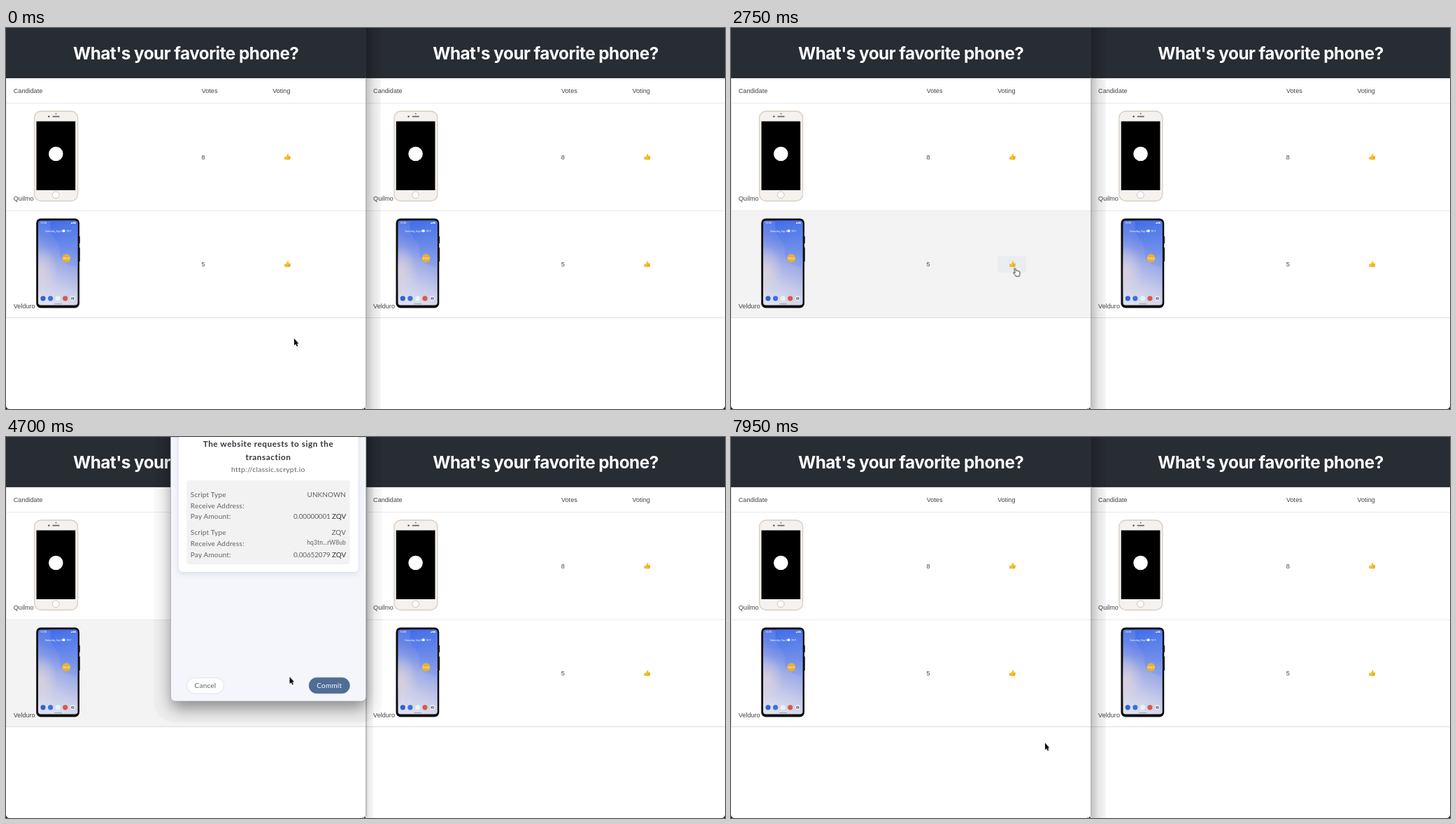
An HTML page that plays this animation: 1028 px wide and 545 px high, repeating every 8 s.

```html
<!DOCTYPE html>
<html lang="en">
<head>
<meta charset="utf-8">
<title>Favorite phone vote</title>
<style>
  html, body { margin: 0; width: 100%; height: 100%; overflow: hidden; background: #000; }
  svg { display: block; width: 1028px; height: 545px; }
  .title { font: 700 24.3px Inter, sans-serif; letter-spacing: -.52px; fill: #fff; text-anchor: middle; }
  .cell { font: 9.1px "Liberation Sans", Arial, sans-serif; fill: #444; }
  .tiny { font: 3.6px Roboto, sans-serif; fill: #fff; }
  .dialog { font: 10px Lato, sans-serif; fill: #606266; letter-spacing: .2px; }
  .head { font-size: 11.8px; font-weight: 700; fill: #33363c; letter-spacing: .53px; text-anchor: middle; }
  .url { font-size: 10.4px; letter-spacing: .3px; }
  .mid { text-anchor: middle; }
  .end { text-anchor: end; letter-spacing: .05px; }
  .sum { letter-spacing: -.18px; }
  .addr { font-size: 8.6px; }
  .unit { fill: #303236; }
  .line { stroke: #e9e9e9; }

  /* One shared 8 s clock; switches are hard steps. */
  .switch { animation: 8s step-end infinite; }
  #row1 { animation-name: row1; }
  #row2 { animation-name: row2; }
  #vote { animation-name: vote; }
  #popup { animation-name: popup; }
  #softShade { animation-name: blurred; }
  #deepShade { animation-name: focused; }
  #arrow { animation-name: arrow; }
  #hand { animation-name: hand; }
  #cursor { animation: move 8s ease-in-out infinite; }

  @keyframes row1 { 0%, 21.1%, 100% { opacity: 0 } 15.9% { opacity: 1 } }
  @keyframes row2 { 0%, 15.9%, 73%, 100% { opacity: 0 } 9%, 21.1% { opacity: 1 } }
  @keyframes vote { 0%, 58%, 100% { opacity: 0 } 24% { opacity: 1 } }
  @keyframes popup { 0%, 70%, 100% { opacity: 0 } 58% { opacity: 1 } }
  @keyframes blurred { 0%, 70%, 100% { opacity: 0 } 57.4% { opacity: 1 } }
  @keyframes focused { 0%, 70%, 100% { opacity: 1 } 57.4% { opacity: 0 } }
  @keyframes arrow { 0%, 58%, 70%, 100% { opacity: 1 } 24%, 62.8% { opacity: 0 } }
  @keyframes hand { 0%, 58%, 70%, 100% { opacity: 0 } 24%, 62.8% { opacity: 1 } }
  @keyframes move {
    0% { transform: translate(412px, 444px) }
    5.5% { transform: translate(412px, 444px); animation-timing-function: ease-in }
    15.625% { transform: translate(353px, 260px); animation-timing-function: ease-out }
    18.125%, 18.75% { transform: translate(350px, 238px) }
    26.25%, 60% { transform: translate(405.5px, 343px) }
    65.6%, 70% { transform: translate(460px, 354px) }
    75%, 100% { transform: translate(449px, 437.5px) }
  }
</style>
</head>
<body>
<svg viewBox="0 0 1028 545">
  <defs>
    <linearGradient id="deep">
      <stop offset="0" stop-color="#000" stop-opacity=".24"/>
      <stop offset=".5" stop-color="#000" stop-opacity=".1"/>
      <stop offset="1" stop-color="#000" stop-opacity=".035"/>
    </linearGradient>
    <linearGradient id="soft">
      <stop offset="0" stop-color="#000" stop-opacity=".2"/>
      <stop offset=".3" stop-color="#000" stop-opacity=".08"/>
      <stop offset="1" stop-color="#000" stop-opacity=".025"/>
    </linearGradient>
    <linearGradient id="sky" x1=".6" y1="0" x2=".4" y2="1">
      <stop offset="0" stop-color="#4a76ea"/>
      <stop offset=".25" stop-color="#6886e8"/>
      <stop offset=".5" stop-color="#a0ade7"/>
      <stop offset=".75" stop-color="#c6cbea"/>
      <stop offset="1" stop-color="#dfe0ee"/>
    </linearGradient>
    <linearGradient id="wave" x1="0" y1="0" x2=".2" y2="1">
      <stop offset="0" stop-color="#3f6be8"/>
      <stop offset="1" stop-color="#7f9cec" stop-opacity=".5"/>
    </linearGradient>
    <radialGradient id="warm">
      <stop offset="0" stop-color="#e2d4da" stop-opacity=".75"/>
      <stop offset="1" stop-color="#e2d4da" stop-opacity="0"/>
    </radialGradient>
    <filter id="blur" x="-30%" y="-30%" width="160%" height="160%"><feGaussianBlur stdDeviation="11"/></filter>
    <filter id="blurSmall" x="-10%" y="-10%" width="120%" height="120%"><feGaussianBlur stdDeviation="4"/></filter>
    <clipPath id="screen"><rect x="46" y="275.5" width="56.5" height="121" rx="4"/></clipPath>
    <clipPath id="leftHalf"><rect width="515" height="545"/></clipPath>

    <g id="thumb">
      <path d="M398 184.2H400.4L402.3 181Q402.4 179.6 403.4 179.8Q404.7 180.2 403.8 183.1H406.2Q407.2 183.5 406.6 184.5Q407.3 185.2 406.5 186Q407 186.9 406.1 187.4Q406.2 188.5 405 188.6H401.5L398 188Z" fill="#f6bd2c"/>
      <path d="M403.4 184.6H406.4M403.4 186.1H406.3M403.2 187.4H406" stroke="#d78f16" stroke-width=".5"/>
    </g>

    <g id="lightPhone">
      <rect x="40.6" y="119" width="62" height="128.5" rx="9.5" fill="#f4f1ee" stroke="#d8cec3" stroke-width="1.3"/>
      <rect x="43.5" y="133.5" width="55.7" height="98.5"/>
      <circle cx="71.3" cy="180" r="10.3" fill="#fff"/>
      <circle cx="71.5" cy="122.6" r=".9" fill="#55575c"/>
      <circle cx="61.3" cy="126.6" r="1.2" fill="#3e4252"/>
      <rect x="66.3" y="125.8" width="10.4" height="1.6" rx=".8" fill="#686868"/>
      <circle cx="71.2" cy="238.8" r="4.9" fill="#fff" stroke="#c6c2bf"/>
    </g>

    <g id="darkPhone">
      <path d="M104.5 298H105.7V308H104.5ZM104.5 314H105.7V334H104.5Z"/>
      <rect x="43.2" y="272.4" width="61.8" height="128" rx="6.5" fill="#0c0d0e"/>
      <g clip-path="url(#screen)">
        <rect x="46" y="275" width="57" height="122" fill="url(#sky)"/>
        <path d="M64 275Q61 293 72 304Q78 311 77 324Q78 338 103 342V275Z" fill="url(#wave)"/>
        <ellipse cx="51" cy="348" rx="23" ry="36" fill="url(#warm)"/>
      </g>
      <text class="tiny" x="49" y="280">12:00</text>
      <path d="M92.5 280L95 277.5V280ZM96 277.5H97.2V280H96ZM98 277.5H99.4V280H98Z" fill="#fff"/>
      <text class="tiny" x="56" y="291.5">Saturday, Sep 8</text>
      <circle cx="82.5" cy="290.2" r="2" fill="#fff"/>
      <text class="tiny" x="86" y="291.5">70°F</text>
      <circle cx="86.2" cy="329.3" r="6" fill="#e9b036"/>
      <text class="tiny mid" x="86.2" y="330.6">HOLD</text>
      <circle cx="53" cy="386.8" r="3.6" fill="#2e63d4"/>
      <circle cx="63.6" cy="386.8" r="3.6" fill="#3c70e0"/>
      <circle cx="74.2" cy="386.8" r="3.6" fill="#e6f3ee"/>
      <circle cx="84.7" cy="386.8" r="3.6" fill="#d9594a"/>
      <circle cx="95.3" cy="386.8" r="3.6" fill="#f0f1f5"/>
      <rect x="93.3" y="385.3" width="4" height="3.2" rx=".6" fill="#555a63"/>
      <circle cx="95.3" cy="386.9" r=".8" fill="#fff"/>
      <path d="M69 394.6H80" stroke="#8f99a6" stroke-width=".9"/>
    </g>

    <g id="page">
      <rect width="515" height="71.5" fill="#282c33"/>
      <path d="M0 71H515" stroke="#15181c"/>
      <text class="title" x="257.2" y="45.3">What's your favorite phone?</text>
      <path class="line" d="M.5 72V414M0 107.5H515M0 261.5H515"/>
      <path d="M0 414.5H515" stroke="#dedede"/>
      <g class="cell">
        <text x="10.8" y="93">Candidate</text>
        <text x="279.7" y="93">Votes</text>
        <text x="381.2" y="93">Voting</text>
        <text x="10.8" y="247.2">Quilmo</text>
        <text x="279.5" y="187.6">8</text>
        <text x="10.8" y="400.6">Velduro</text>
        <text x="279.5" y="341">5</text>
      </g>
      <use href="#lightPhone"/>
      <use href="#darkPhone"/>
      <use href="#thumb"/>
      <use href="#thumb" y="153.4"/>
    </g>
  </defs>

  <!-- right window -->
  <path d="M514 0H1028V540Q1028 545 1023 545H514Z" fill="#fff"/>
  <use href="#page" x="514.3"/>
  <rect id="deepShade" class="switch" x="515" width="21" height="545" fill="url(#deep)"/>
  <rect id="softShade" class="switch" x="515" width="10.5" height="545" fill="url(#soft)"/>

  <!-- left window -->
  <path d="M0 0H515V539Q515 545 509 545H5Q0 545 0 540Z" fill="#fff"/>
  <rect id="row1" class="switch" x="1" y="108" width="514" height="153" fill="#f3f3f3"/>
  <rect id="row2" class="switch" x="1" y="262" width="514" height="152" fill="#f3f3f3"/>
  <rect id="vote" class="switch" x="381" y="326.5" width="41" height="23.5" rx="2.5" fill="#e9edf0"/>
  <g clip-path="url(#leftHalf)"><use href="#page"/></g>
  <path d="M514.7 71V539Q514.7 544.6 509 544.6" fill="none" stroke="#a2a2a2" stroke-width=".9"/>

  <!-- signing dialog -->
  <g id="popup" class="switch">
    <rect x="211.5" y="-40" width="326" height="448" rx="28" opacity=".025"/>
    <rect x="236" y="-30" width="279" height="418" rx="8" opacity=".42" filter="url(#blur)"/>
    <path d="M235.4 0H514.8V371Q514.8 378 507.8 378H242.4Q235.4 378 235.4 371Z" fill="#f4f6fb" stroke="#9a9ea6" stroke-width=".7"/>
    <rect x="247" y="-10" width="256" height="205" rx="6" fill="#5a6880" opacity=".2" filter="url(#blurSmall)"/>
    <rect x="247" y="-10" width="256.5" height="203" rx="6" fill="#fff"/>
    <rect x="258.5" y="62" width="233" height="120" rx="3" fill="#f2f2f2"/>
    <g class="dialog">
      <text class="head" x="375" y="14">The website requests to sign the</text>
      <text class="head" x="375" y="33.2">transaction</text>
      <text class="mid url" x="374.8" y="50">http://classic.scrypt.io</text>
      <text x="263.8" y="86">Script Type</text>
      <text x="263.8" y="101.6">Receive Address:</text>
      <text x="263.8" y="117.3">Pay Amount:</text>
      <text x="263.8" y="140.2">Script Type</text>
      <text x="263.8" y="155.9">Receive Address:</text>
      <text x="263.8" y="171.5">Pay Amount:</text>
      <text class="end" x="486" y="86">UNKNOWN</text>
      <text class="end sum" x="486" y="117.3">0.00000001 <tspan class="unit">ZQV</tspan></text>
      <text class="end" x="486" y="140.2">ZQV</text>
      <text class="end addr" x="486" y="154.4">hq3tn...rW8ub</text>
      <text class="end sum" x="486" y="171.5">0.00652079 <tspan class="unit">ZQV</tspan></text>
      <rect x="258.5" y="344.5" width="53" height="22.5" rx="11.2" fill="#fff" stroke="#dfe1e6"/>
      <text class="mid" x="285" y="359.2">Cancel</text>
      <rect x="433.2" y="344.2" width="58.2" height="22.6" rx="11.3" fill="#4f6d96" stroke="#46648d" stroke-width=".6"/>
      <text class="mid" x="462.3" y="359.2" fill="#fff">Commit</text>
    </g>
  </g>

  <g id="cursor">
    <path id="arrow" class="switch" d="M0 0V10L2.2 8L3.8 11.4L5.4 10.7L3.9 7.4H6.5Z" fill="#0a0a0a" stroke="#fff" stroke-width=".9" paint-order="stroke"/>
    <path id="hand" class="switch" d="M-.6 1.2Q.3 -.3 1.3 1.2L2.3 4.4Q3.4 3.6 4.2 4.6Q5.4 3.9 6 5.1Q7.2 4.8 7.5 6.2Q8 9 6.7 12.2H1.8Q.9 9.9 -1.4 8Q-2 6.6 -.5 6.7L.7 7.5Z" fill="#fff" stroke="#222" stroke-width=".9" stroke-linejoin="round"/>
  </g>
</svg>
</body>
</html>
```
